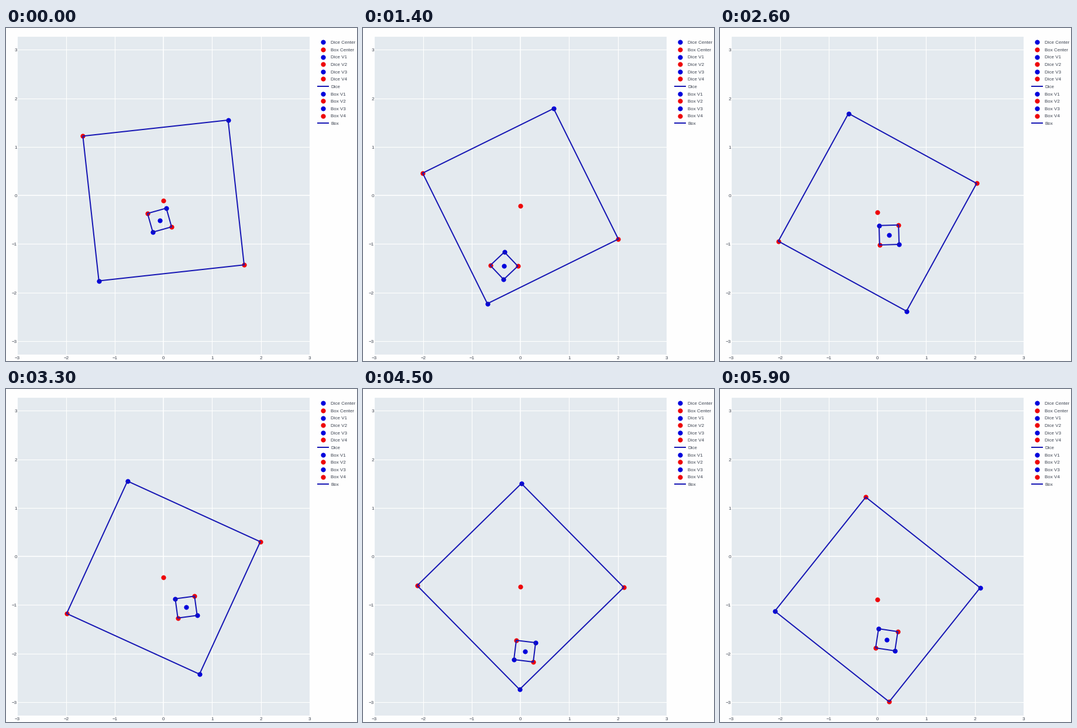
Recreate the animation shown at these times as a matplotlib script. Size 600 by 571 pixels, loop 6 s.

```python
import numpy as np
import matplotlib.pyplot as plt
from matplotlib.animation import FuncAnimation
from matplotlib.patches import Rectangle

W, H, DPI = 600, 571, 100
FRAMES, STEP = 60, 100
PX = 72 / DPI
BLUE, RED, LINE = "#0000dc", "#ee0408", "#1616b4"
PLOT_BG, TEXT = "#e4eaef", "#3c4350"
X0, Y0, UNIT = 269.2, 287.2, 83.25
BOX_R = 1.5 * np.sqrt(2) * UNIT
DICE_R = 0.2 * np.sqrt(2) * UNIT
GRAVITY = 75  # pixels per second squared

plt.rcParams["font.family"] = "Liberation Sans"

# Box rotation in degrees: (seconds, angle)
BOX_TURN = np.array([
    (0, 6.3), (0.7, 13.8), (0.9, 17.5), (1.4, 26.3), (1.9, 43.7), (2.6, 61.3),
    (3.3, 65.4), (3.9, 59.6), (4.5, 44.5), (5.2, 7.1), (5.6, -23), (5.9, -38.5),
])
# Slow sinking of the box centre: (seconds, y)
BOX_SINK = np.array([
    (0, 296), (0.9, 301), (1.9, 310), (3.3, 323.5), (4.5, 338.5), (5.2, 349), (5.9, 361),
])
SINK_FIT = np.polyfit(*BOX_SINK.T, 3)
# Dice flight: (seconds, x, y, angle of the first vertex)
DICE_PATH = np.array([
    (0, 262.5, 329.5, 60.7), (0.9, 237, 396, 68.9), (1.2, 229.5, 427, 71.6),
    (1.9, 270, 372.5, 130.7), (3.3, 308, 374, 142.7), (4.05, 324, 437, 149),
    (4.5, 276.5, 449.5, 218), (4.77, 248, 467, 258), (5.2, 271, 447, 320.2),
    (5.3, 275, 443, 330), (5.9, 285, 430, 306.4),
])


def segment(times, t):
    return min(np.searchsorted(times, t, side="right") - 1, len(times) - 2)


def smooth(keys, t):
    """Cubic Hermite curve through (time, value) keys."""
    ts, vs = keys.T
    slopes = np.gradient(vs, ts)
    i = segment(ts, t)
    h = ts[i + 1] - ts[i]
    u = (t - ts[i]) / h
    return ((1 + 2 * u) * (1 - u) ** 2 * vs[i] + u * (1 - u) ** 2 * h * slopes[i]
            + u * u * (3 - 2 * u) * vs[i + 1] + u * u * (u - 1) * h * slopes[i + 1])


def box_pose(t):
    return X0, np.polyval(SINK_FIT, t), smooth(BOX_TURN, t) + 45


def dice_pose(t):
    """Straight drift plus a falling arc between two bounces."""
    ts = DICE_PATH[:, 0]
    i = segment(ts, t)
    a, b = ts[i], ts[i + 1]
    x, y, angle = (np.interp(t, ts, DICE_PATH[:, k]) for k in (1, 2, 3))
    return x, y - GRAVITY / 2 * (t - a) * (b - t), angle


def corners(x, y, angle, radius):
    a = np.radians(angle + 90 * np.arange(5))
    return x + radius * np.cos(a), y - radius * np.sin(a)


fig = plt.figure(figsize=(W / DPI, H / DPI), dpi=DPI, facecolor="#fefefe")
ax = fig.add_axes([0, 0, 1, 1])
ax.set_xlim(0, W)
ax.set_ylim(H, 0)
ax.axis("off")


def label(x, y, text, align):
    ax.text(x, y + 2.9, text, size=8 * PX, color=TEXT, ha=align, va="baseline")


def dots(color, z, x=(), y=()):
    return ax.plot(x, y, "o", ms=8.2 * PX, mec="none", color=color, zorder=z)[0]


def stroke(z, x=(), y=()):
    return ax.plot(x, y, color=LINE, lw=2 * PX, solid_capstyle="butt",
                   solid_joinstyle="round", zorder=z)[0]


def draw_grid():
    left, top, right, bottom = 20, 15, 519, 559.5
    ax.add_patch(Rectangle((left, top), right - left, bottom - top,
                           fc=PLOT_BG, ec="none", zorder=0))
    for n in range(-3, 4):
        name = str(n).replace("-", "\u2212")
        gx, gy = X0 + n * UNIT, Y0 - n * UNIT
        style = dict(color="white", lw=(1.6 if n == 0 else 1.1) * PX, zorder=1)
        if abs(n) < 3:
            ax.plot([gx, gx], [top, bottom], **style)
        ax.plot([left, right], [gy, gy], **style)
        label(gx, 565.5, name, "center")
        label(19, gy, name, "right")


def draw_legend():
    names = ["Dice Center", "Box Center"]
    for part in ("Dice", "Box"):
        names += [f"{part} V{k}" for k in range(1, 5)] + [part]
    color = BLUE
    for i, name in enumerate(names):
        y = 24.3 + 12.62 * i
        if name in ("Dice", "Box"):
            stroke(2, [532, 552], [y, y])
        else:
            dots(color, 2, [542], [y])
            color = RED if color == BLUE else BLUE
        label(555, y, name, "left")


draw_grid()
draw_legend()

dice_center, box_center = dots(BLUE, 3), dots(RED, 3)
shapes = []
for z, pose, radius in ((4, dice_pose, DICE_R), (6, box_pose, BOX_R)):
    shapes.append((pose, radius, dots(BLUE, z), dots(RED, z), stroke(z + 1)))


def update(frame):
    t = frame * STEP / 1000
    artists = []
    for (pose, radius, blue, red, edge), center in zip(shapes, (dice_center, box_center)):
        x, y, angle = pose(t)
        xs, ys = corners(x, y, angle, radius)
        center.set_data([x], [y])
        blue.set_data(xs[0:4:2], ys[0:4:2])
        red.set_data(xs[1:4:2], ys[1:4:2])
        edge.set_data(xs, ys)
        artists += [center, blue, red, edge]
    return artists


anim = FuncAnimation(fig, update, frames=FRAMES, interval=STEP, repeat=True, repeat_delay=0)
plt.show()
```
